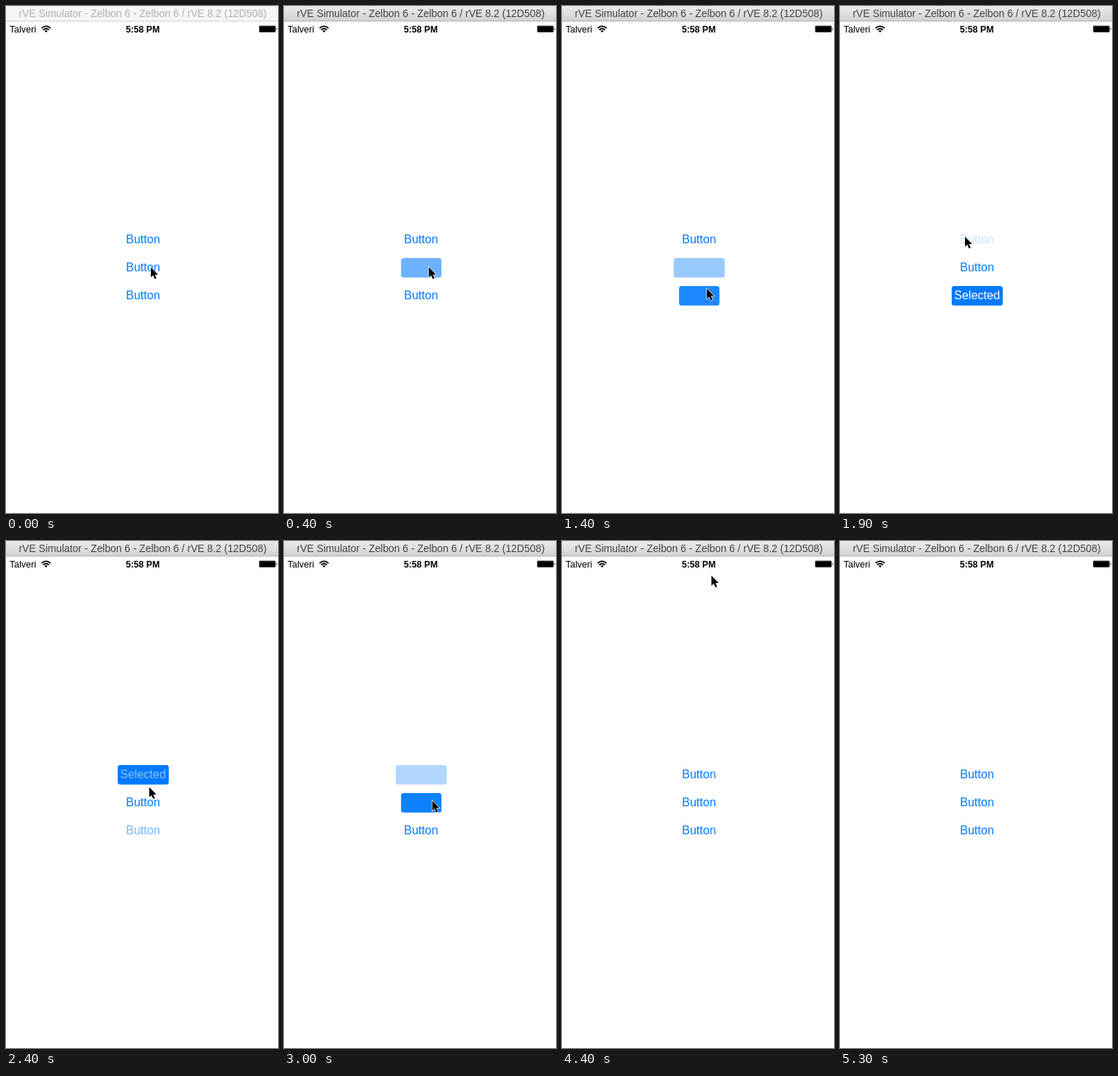
These frames come from a looping animation (370x688 px, 5800 ms). An HTML page:

```html
<!DOCTYPE html>
<html>
<head>
<meta charset="utf-8">
<style>
html, body { margin: 0; width: 100%; height: 100%; overflow: hidden; background: #fff; }
svg { display: block; font-family: "Liberation Sans", Arial, sans-serif; text-anchor: middle; }
</style>
</head>
<body>
<svg width="370" height="688" viewBox="0 0 370 688">
  <defs>
    <linearGradient id="shade" x2="0" y2="1">
      <stop stop-color="#ebebeb"/><stop offset="1" stop-color="#d2d2d2"/>
    </linearGradient>
  </defs>
  <rect id="bar" width="370" height="20"/>
  <rect id="edge" y="20" width="370" height="1"/>
  <text id="title" x="186" y="15" font-size="13.85">rVE Simulator - Zelbon 6 - Zelbon 6 / rVE 8.2 (12D508)</text>

  <text x="4.7" y="35.5" font-size="12.6" text-anchor="start">Talveri</text>
  <g fill="none" stroke="#000" stroke-width="1.7">
    <path d="M48.4 30.2Q54.5 24.6 60.6 30.2M50.6 32.5Q54.5 29 58.4 32.5"/>
    <path d="M54.5 36L52.4 33.8Q54.5 32.2 56.6 33.8Z" fill="#000" stroke="none"/>
  </g>
  <text x="186" y="35.5" font-size="12.2" font-weight="bold">5:58 PM</text>
  <rect x="344.5" y="27" width="22" height="8.5" rx="1" stroke="#666"/>
  <path d="M367.6 29.5Q369.6 31.2 367.6 33Z"/>

  <g id="rows"></g>
  <path id="cursor" d="M0 0V13.7L3.1 10.8L5.4 16L7.7 15L5.5 10H9.8Z" stroke="#fff" stroke-width="1.3" paint-order="stroke"/>
</svg>
<script>
const LOOP = 5800, STEP = 100, BLUE = '#007aff';
const PRESS = 210, FADE = 300, TEXT = 200;   // finger down, box change, label change
const REST = 200, TRAVEL = 400, BOW = 0.2;   // pointer: pause after a tap, trip, bend
const $ = id => document.getElementById(id);
const clamp = v => Math.max(0, Math.min(1, v));
const ease = p => p * p * (3 - 2 * p);

// Pointer stops in order; those with a row are taps on it
const stops = [
  { at: 310, row: 1, x: 197, y: 354.5 },
  { at: 1220, row: 2, x: 197, y: 383.5 },
  { at: 1990, row: 0, x: 170, y: 313 },
  { at: 2790, row: 1, x: 201.7, y: 352.3 },
  { at: 3710, row: 1, x: 203.3, y: 352 },
  { at: 4600, x: 203.3, y: 47 },
  { at: LOOP, x: 203.3, y: -20 }
];

function set(el, attrs) {
  for (const k in attrs) el.setAttribute(k, attrs[k]);
}
function add(tag, attrs) {
  const el = document.createElementNS('http://www.w3.org/2000/svg', tag);
  set(el, attrs);
  return $('rows').appendChild(el);
}

const rows = [0, 1, 2].map(i => {
  const y = 317 + 38 * i;
  return {
    box: add('rect', { y: y - 13, height: 26.5, rx: 3.5, fill: BLUE }),
    label: add('text', { x: 186.4, y: y + 5, 'font-size': 16 })
  };
});

function rowState(i, t) {
  const state = { on: false, box: 0, text: 1, wide: false };
  let chosen = -1;
  for (const { at, row } of stops.filter(s => 'row' in s)) {
    const before = chosen;
    chosen = row === before ? -1 : row;
    if (row === i && t >= at - PRESS) state.text = 0.2;
    if (t < at) break;
    if (row !== i && before !== i) continue;
    const p = clamp((t - at) / FADE);
    state.on = chosen === i;
    state.box = state.on ? 1 - (1 - p) ** 2.4 : 1 - p;
    state.wide = !state.on || p === 1;
    state.text = clamp((t - at - FADE) / TEXT);
  }
  return state;
}

function pointer(t) {
  let { x, y } = stops[0];
  stops.slice(1).forEach((to, i) => {
    const from = stops[i], p = clamp((t - from.at - REST) / TRAVEL);
    if (!p) return;
    const bend = BOW * Math.abs(to.y - from.y) * Math.sin(Math.PI * ease(p));
    x = from.x + (to.x - from.x) * ease(p) + bend;
    y = from.y + (to.y - from.y) * ease(p);
  });
  return [x, y];
}

function draw(time) {
  const t = Math.floor(time % LOOP / STEP) * STEP;
  const active = t >= STEP;
  set($('bar'), { fill: active ? 'url(#shade)' : '#f6f6f6' });
  set($('edge'), { fill: active ? '#b1b1b1' : '#d1d1d1' });
  set($('title'), { fill: active ? '#444' : '#b0b0b0' });
  rows.forEach(({ box, label }, i) => {
    const s = rowState(i, t), width = s.wide ? 69.5 : 55;
    set(box, { x: 186.7 - width / 2, width, opacity: s.box });
    set(label, { fill: s.on ? '#fff' : BLUE, opacity: s.text });
    label.textContent = s.on ? 'Selected' : 'Button';
  });
  set($('cursor'), { transform: `translate(${pointer(t)})` });
}

const began = performance.now();
function tick() {
  draw(performance.now() - began);
  requestAnimationFrame(tick);
}
tick();
</script>
</body>
</html>
```
